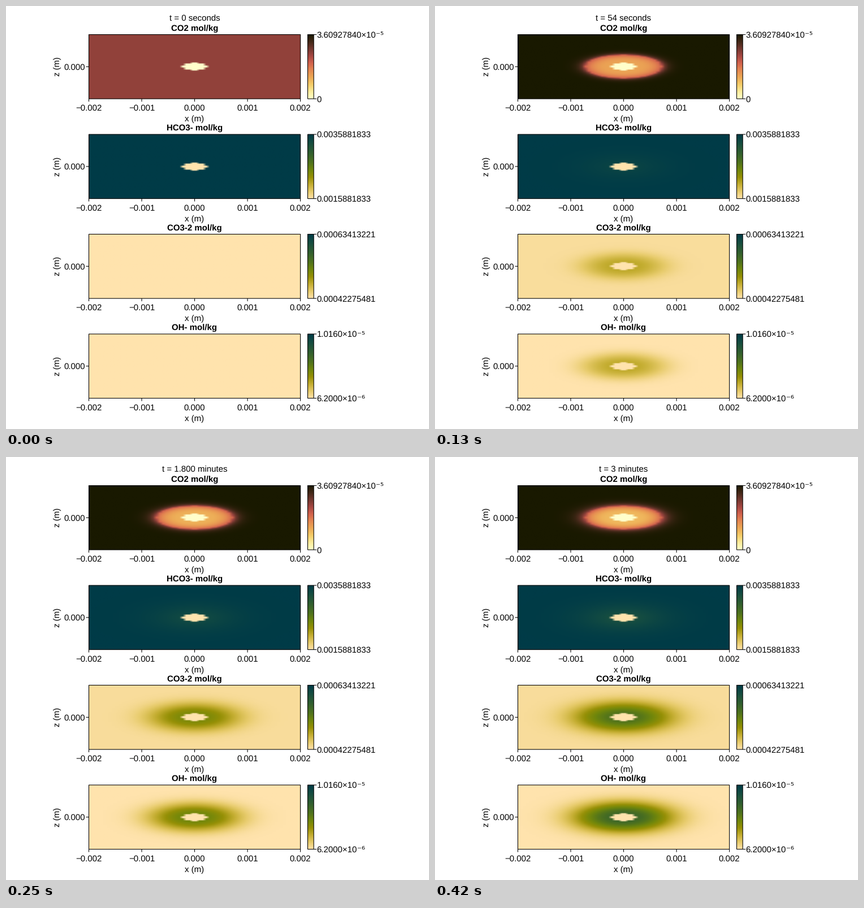
Write a matplotlib script that moves like this. It is 748x748 px and loops after 460 ms.

```python
import matplotlib.pyplot as plt
import numpy as np
from matplotlib.animation import FuncAnimation
from matplotlib.colors import LinearSegmentedColormap
from matplotlib.patches import Rectangle

SIZE, DPI = 748, 100
FONT_PT = 14.96 * 72 / DPI
LINE = 1.07 * 72 / DPI
LEFT, RIGHT, MID = 146.5, 520.6, 333.5
BAR_L, BAR_R = 533.5, 544.2
TOP, PITCH, HEIGHT = 50.5, 176.5, 113.6
GRID = 64
STEPS = 10
SHELL = 0.72

plt.rcParams.update({
    "font.family": "Liberation Sans",
    "font.size": FONT_PT,
    "text.hinting": "none",
    "text.hinting_factor": 1,
})

warm = LinearSegmentedColormap.from_list("warm", [
    "#FFFECB", "#FBEC9A", "#F4CC68", "#ECA855", "#E48751",
    "#D2624D", "#A54742", "#73382F", "#422818", "#191900"], N=512)
moss = LinearSegmentedColormap.from_list("moss", [
    "#FFE3AD", "#E7CB6B", "#C5AE32", "#969006", "#71870B",
    "#52741C", "#3A652A", "#265737", "#134B42", "#003B47"], N=512)

# radius in millimetres at the cell centres
cells = (np.arange(GRID) + 0.5) / GRID * 4 - 2
R = np.hypot(*np.meshgrid(cells, cells))
SPHERE = R <= 0.23


def co2(k):
    if k == 0:
        return np.full_like(R, 0.71)
    far = 1 - 0.027 * np.exp(-2.5 * (k - 1))
    core = 0.27 + 0.13 * np.exp(-(k - 1) / 4)
    s = np.clip((R - 0.25) / (SHELL - 0.25), 0, 1)
    inside = core + (0.57 - core) * s ** 2.5
    tail = np.exp(-np.maximum(R - SHELL, 0) / (0.075 + 0.006 * k))
    return np.where(R < SHELL, inside, far - 0.37 * tail)


def growth(k, top, tau, delay=0.0):
    return top * (1 - np.exp(-max(k - delay, 0) / tau))


def halo(k):
    half = 0.66 + 0.012 * k
    power = 2.1 + 2 / max(k, 1)
    return np.exp(-np.log(2) * (R / half) ** power)


def hco3(k):
    return 1 - growth(k, 0.24, 9) * np.exp(-(R / 0.75) ** 1.5)


def co3(k):
    base = growth(k, 0.03, 1)
    return base + (growth(k, 0.88, 9) - base) * halo(k)


def oh(k):
    return growth(k, 1.18, 11, 0.45) * halo(k)


PANELS = [
    ("CO2 mol/kg", co2, warm, ("3.60927840×10", "⁻⁵"), ("0", "")),
    ("HCO3- mol/kg", hco3, moss, ("0.0035881833", ""), ("0.0015881833", "")),
    ("CO3-2 mol/kg", co3, moss, ("0.00063413221", ""), ("0.00042275481", "")),
    ("OH- mol/kg", oh, moss, ("1.0160×10", "⁻⁵"), ("6.2000×10", "⁻⁶")),
]

fig = plt.figure(figsize=(SIZE / DPI, SIZE / DPI), dpi=DPI, facecolor="white")
ax = fig.add_axes([0, 0, 1, 1])
ax.axis("off")


def label(x, y, text, ha="center", **kw):
    return ax.text(x, y, text, ha=ha, va="baseline", color="black", **kw)


def line(xs, ys):
    ax.plot(xs, ys, color="black", lw=LINE, solid_capstyle="butt",
            snap=False, zorder=3)


def picture(rgb, x0, x1, y0, y1):
    return ax.imshow(rgb, extent=(x0, x1, y1, y0), origin="upper",
                     interpolation="bilinear", aspect="auto", zorder=1)


def frame(x0, x1, y0, y1):
    ax.add_patch(Rectangle((x0, y0), x1 - x0, y1 - y0, fill=False,
                           ec="black", lw=LINE, snap=False, zorder=3))


def bar_label(y, text, power):
    line([BAR_R, BAR_R + 5], [y, y])
    base = label(549.5, y + 5.3, text, ha="left")
    if power:
        ax.annotate(power, xy=(1, y + 5.3), xycoords=(base, "data"),
                    ha="left", va="baseline", family="DejaVu Sans")


def colours(field, cmap, k):
    return cmap(np.where(SPHERE, 0, field(k)))[..., :3]


def build_panel(i, title, field, cmap, high, low):
    y0 = TOP + i * PITCH
    y1 = y0 + HEIGHT
    mid = (y0 + y1) / 2
    image = picture(colours(field, cmap, 0), LEFT, RIGHT, y0, y1)
    frame(LEFT, RIGHT, y0, y1)
    label(MID, y0 - 5.7, title, weight="bold")
    for j, text in enumerate(["−0.002", "−0.001", "0.000", "0.001", "0.002"]):
        x = LEFT + j * (RIGHT - LEFT) / 4
        line([x, x], [y1, y1 + 5])
        label(x, y1 + 20.8, text)
    label(MID, y1 + 39.8, "x (m)")
    line([LEFT - 5, LEFT], [mid, mid])
    label(139.5, mid + 5.3, "0.000", ha="right")
    ax.text(98, mid, "z (m)", rotation=90, ha="right", va="center")

    ramp = cmap(np.linspace(1, 0, 256))[:, None, :3]
    picture(ramp, BAR_L, BAR_R, y0, y1)
    frame(BAR_L, BAR_R, y0, y1)
    bar_label(y0, *high)
    bar_label(y1, *low)
    return image


images = [build_panel(i, *panel) for i, panel in enumerate(PANELS)]
clock = label(MID, 26.7, "")
ax.set_xlim(0, SIZE)
ax.set_ylim(SIZE, 0)


def clock_text(k):
    seconds = 18 * k
    if seconds < 60:
        return f"t = {seconds} seconds"
    if seconds % 60 == 0:
        return f"t = {seconds // 60} minutes"
    return f"t = {seconds / 60:.3f} minutes"


def update(n):
    # 24 steps per second, rounded to 10 ms ticks
    k = sum(n >= int(s * 25 / 6 + 0.5) for s in range(1, STEPS + 1))
    clock.set_text(clock_text(k))
    for image, (_, field, cmap, *_) in zip(images, PANELS):
        image.set_data(colours(field, cmap, k))
    return [clock, *images]


anim = FuncAnimation(fig, update, frames=46, interval=10, repeat=True,
                     repeat_delay=0, blit=False)
plt.show()
```
